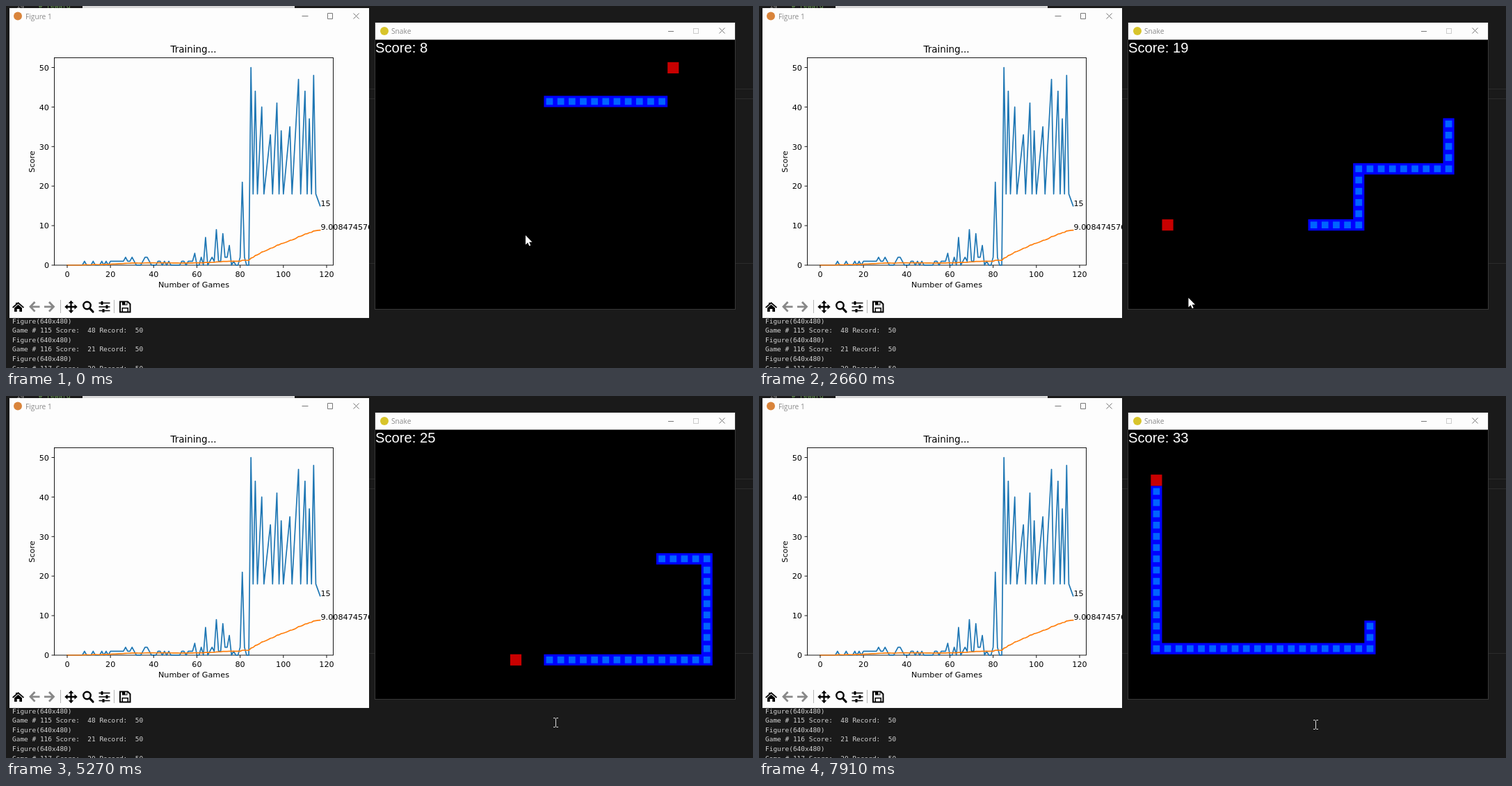
These frames come from a looping animation (1074 px wide and 521 px high, 8000 ms). An HTML page with a canvas:

```html
<!DOCTYPE html>
<html lang="en">
<head>
<meta charset="utf-8">
<title>Snake training</title>
<style>
html, body { margin: 0; width: 100%; height: 100%; overflow: hidden; background: #1a1a1a; }
svg, canvas { position: absolute; left: 0; top: 0; width: 1074px; height: 521px; display: block; }
.mono text { font: 9.47px "DejaVu Sans Mono", "Noto Sans Mono", monospace; white-space: pre; }
.plot { font: 11.2px "DejaVu Sans", sans-serif; fill: #000; }
.caption { font: 10.2px "Open Sans", "Noto Sans", sans-serif; fill: #8a8a8a; }
.line { fill: none; stroke-width: 1.7; stroke-linejoin: round; stroke-linecap: square; }
</style>
</head>
<body>
<svg viewBox="0 0 1074 521">
  <defs><clipPath id="figure"><rect x="5" y="3" width="517" height="446"/></clipPath></defs>
  <rect width="1074" height="521" fill="#1a1a1a"/>
  <path d="M522 119.5H1074M522 133.5H1074M522 370.5H1074" stroke="#2c2c2c"/>
  <g class="mono">
    <text x="15" y="3" fill="#858585">14</text>
    <text x="47" y="3" fill="#6a9955"># reward</text>
  </g>
  <rect x="110" width="305" height="3" fill="#d8d8d8"/>
  <g id="log" class="mono" fill="#d4d4d4"></g>

  <g clip-path="url(#figure)">
    <rect x="5" y="3" width="517" height="446" fill="#fdfdfd"/>
    <circle cx="17" cy="14.5" r="6" fill="#d9843b"/>
    <text class="caption" x="28" y="18.5">Figure 1</text>
    <path d="M425.5 14.5H434.5M462.5 10.5H469.5V18.5H462.5ZM499.5 10.5L507.5 18.5M507.5 10.5L499.5 18.5" fill="none" stroke="#777"/>
    <g id="plot" class="plot">
      <text x="269.5" y="67" font-size="13.5" text-anchor="middle">Training...</text>
      <text x="270" y="405" text-anchor="middle">Number of Games</text>
      <text transform="translate(40.5 224) rotate(-90)" text-anchor="middle">Score</text>
      <text x="452.5" y="287.5">15</text>
      <text x="452.5" y="321.5">9.008474576271187</text>
      <rect x="69.5" y="74.5" width="401" height="298.5" fill="none" stroke="#000" stroke-width=".9"/>
    </g>
    <path d="M78.5 423V442M155.5 423V442" stroke="#b5b5b5"/>
    <path d="M17.5 426L26 433.5L24.8 434.8L17.5 428.4L10.3 434.8L9 433.5L14 429.1V427H16V427.4ZM12 434.5L17.5 429.7L23 434.5V440H19.3V436H15.7V440H12Z"/>
    <path d="M41.5 426L35 432.8L41.5 439.6M35.5 432.8H48.5M62 426L68.5 432.8L62 439.6M68 432.8H55" fill="none" stroke="#888" stroke-width="2.8"/>
    <path d="M93.5 426V440M86.5 433H100.5" stroke="#000" stroke-width="2.3"/>
    <path d="M93.5 423.8L97.2 428H89.8ZM93.5 442.2L97.2 438H89.8ZM84.3 433L88.5 429.3V436.7ZM102.7 433L98.5 429.3V436.7Z"/>
    <circle cx="116.5" cy="431" r="5.2" fill="none" stroke="#000" stroke-width="2.5"/>
    <path d="M120.3 435L125 440" stroke="#000" stroke-width="3.2" stroke-linecap="round"/>
    <path d="M133.5 427.5H149.5M133.5 433H149.5M133.5 438.5H149.5" stroke="#000" stroke-width="1.5"/>
    <path d="M138 425V430M145 430.5V435.5M140 436V441" stroke="#000" stroke-width="3"/>
    <path d="M164 425.5H175L178.5 429V440.5H164Z" fill="none" stroke="#000" stroke-width="2"/>
    <path d="M167 425H174.5V430.5H167ZM166.5 434H176V441H166.5Z"/>
    <path d="M171.5 426H173.5V429.5H171.5ZM168 435.5H174.5V439.5H168Z" fill="#fdfdfd"/>
  </g>

  <rect x="530.5" y="24" width="518" height="412.5" fill="#000" stroke="#383838"/>
  <rect x="531" y="24" width="517" height="24.5" fill="#fdfdfd"/>
  <circle cx="544" cy="36" r="6" fill="#d8c42a"/>
  <text class="caption" x="554" y="39.5">Snake</text>
  <path d="M952 36.5H960M1025.5 31.5L1033.5 39.5M1033.5 31.5L1025.5 39.5" stroke="#777"/>
  <rect x="988.5" y="32.5" width="7" height="7" fill="none" stroke="#ccc"/>
</svg>
<canvas id="game" width="1074" height="521"></canvas>

<script>
const NS = 'http://www.w3.org/2000/svg';
function add(parent, tag, attrs, text = '') {
  const el = document.createElementNS(NS, tag);
  for (const key in attrs) el.setAttribute(key, attrs[key]);
  el.textContent = text;
  document.getElementById(parent).append(el);
}

// Linear interpolation between [position, ...values] keys
function sample(keys, at) {
  const i = Math.max(1, keys.findIndex(k => k[0] >= at));
  const a = keys[i - 1], b = keys[i];
  const u = (at - a[0]) / (b[0] - a[0]);
  return a.slice(1).map((v, j) => v + (b[j + 1] - v) * u);
}

// Terminal log
[48, 21, 20].forEach((score, i) => {
  const y = 456.5 + i * 27.3;
  add('log', 'text', { x: 9, y }, 'Figure(640x480)');
  add('log', 'text', { x: 9, y: y + 13.6 }, `Game # ${115 + i} Score:  ${score} Record:  50`);
});

// Training chart: faint noise with lone spikes, then high peaks that each drop back
const GAMES = 118;
const SKILLED = 85;
const spikes = { 30: 2, 59: 3, 64: 7, 69: 9, 72: 8, 75: 5, 81: 21 };
const peaks = [[85, 50], [87, 44], [90, 40], [94, 33], [97, 41], [99, 34], [103, 35], [107, 47], [110, 44], [112, 37], [114, 48]];
const zigzag = [...peaks.flatMap(([n, v]) => [[n, v], [n + 1, 18]]), [GAMES - 1, 15]];
const random = n => Math.abs(Math.sin(n * 12.9898) * 43758.5453) % 1;
const noise = n => n < 7 || n > 82 ? 0 : Math.floor(random(n) * (1.6 + n / 60));
const scores = Array.from({ length: GAMES }, (_, n) =>
  n < SKILLED ? spikes[n] ?? noise(n) : sample(zigzag, n)[0]);
let sum = 0;
const means = scores.map((v, i) => (sum += v) / (i + 1));

const px = n => 88 + n * 3.108;
const py = v => 373 - v * 5.69;
const drawLine = (data, stroke) => add('plot', 'polyline', {
  class: 'line', stroke, points: data.map((v, n) => `${px(n)},${py(v)}`).join(' ')
});
drawLine(scores, '#1f77b4');
drawLine(means, '#ff7f0e');
for (let n = 0; n <= 120; n += 20) {
  add('plot', 'path', { d: `M${px(n)} 373v4`, stroke: '#000', 'stroke-width': 0.9 });
  add('plot', 'text', { x: px(n), y: 389.5, 'text-anchor': 'middle' }, n);
}
for (let v = 0; v <= 50; v += 10) {
  add('plot', 'path', { d: `M69.5 ${py(v)}h-4`, stroke: '#000', 'stroke-width': 0.9 });
  add('plot', 'text', { x: 62, y: py(v) + 4.2, 'text-anchor': 'end' }, v);
}

// The snake goes from stop to stop, first across, then up or down; * marks food
const stops = '25,5 26,2* 2,19* 18,22* 24,14* 6,10* 28,22* 7,16* 20,11* 24,11* 28,9* 28,7* ' +
  '3,16* 3,23 18,3 24,15* 10,7* 27,7* 30,3* 20,11 29,20* 12,20* 5,4* 10,17 4,18* ' +
  '17,11 22,21* 31,8* 8,11* 21,19* 12,19* 2,4*';
const cells = [];
const meals = [];
let x = 15, y = 5;
for (const stop of stops.split(' ')) {
  const [tx, ty] = stop.split(',').map(parseFloat);
  while (x !== tx || y !== ty) {
    cells.push([x, y]);
    if (x !== tx) x += Math.sign(tx - x);
    else y += Math.sign(ty - y);
  }
  if (stop.endsWith('*')) meals.push(cells.length);
}
cells.push([x, y]);

const HEAD = 10;
const FIRST_SCORE = 8;
const STEP = 131.8; // time between screen refreshes
const pace = [[0, 0], [14, 131], [20, 191], [32, 307], [60, 569]]; // [refresh, moves made]
const mouse = [[0, 747, 330], [5, 750, 333], [8, 630, 425], [13, 626, 455], [14, 618, 420],
  [25, 617, 420], [32, 774, 462], [40, 790, 470], [60, 800, 473]]; // [refresh, x, y]

const ctx = document.getElementById('game').getContext('2d');
const CELL = 16.16;
const left = n => 531 + n * CELL;
const top_ = n => 48.5 + n * CELL;
function square(cx, cy, color, inset = 0) {
  const size = CELL * (1 - 2 * inset);
  ctx.fillStyle = color;
  ctx.fillRect(left(cx + inset), top_(cy + inset), size, size);
}

function drawSnake(body) {
  ctx.beginPath();
  for (const [cx, cy] of body) ctx.lineTo(left(cx + 0.5), top_(cy + 0.5));
  ctx.strokeStyle = '#0000ff';
  ctx.lineWidth = CELL;
  ctx.lineCap = 'square';
  ctx.stroke();
  for (const [cx, cy] of body) square(cx, cy, '#0064ff', 0.2);
}

const arrow = new Path2D('M0 0V13.5L3.2 10.6L5.3 15.3L7.3 14.4L5.2 9.8H9.5Z');
const beam = new Path2D('M-3 -6.5H-1L0 -5.5L1 -6.5H3M0 -5.5V5.5M-3 6.5H-1L0 5.5L1 6.5H3');
function drawMouse(mx, my) {
  ctx.save();
  if (my > 440) {
    ctx.translate(Math.round(mx) + 0.5, Math.round(my));
    ctx.strokeStyle = '#ddd';
    ctx.lineWidth = 1;
    ctx.stroke(beam);
  } else {
    ctx.translate(mx, my);
    ctx.fillStyle = '#fff';
    ctx.fill(arrow);
  }
  ctx.restore();
}

function draw(refresh) {
  const head = HEAD + Math.floor(sample(pace, refresh)[0]);
  const eaten = meals.filter(m => m <= head).length;
  const score = FIRST_SCORE + eaten;
  ctx.clearRect(0, 0, 1074, 521);
  drawSnake(cells.slice(head - score - 2, head + 1));
  square(...cells[meals[eaten]], '#c80000');
  ctx.fillStyle = '#fff';
  ctx.font = '20.2px "Liberation Sans", Arial, sans-serif';
  ctx.fillText('Score: ' + score, 531, 67);
  drawMouse(...sample(mouse, refresh));
}

function loop() {
  const now = performance.now() % 8000;
  draw(Math.min(60, Math.floor(now / STEP + 0.15)));
  requestAnimationFrame(loop);
}
loop();
</script>
</body>
</html>
```
